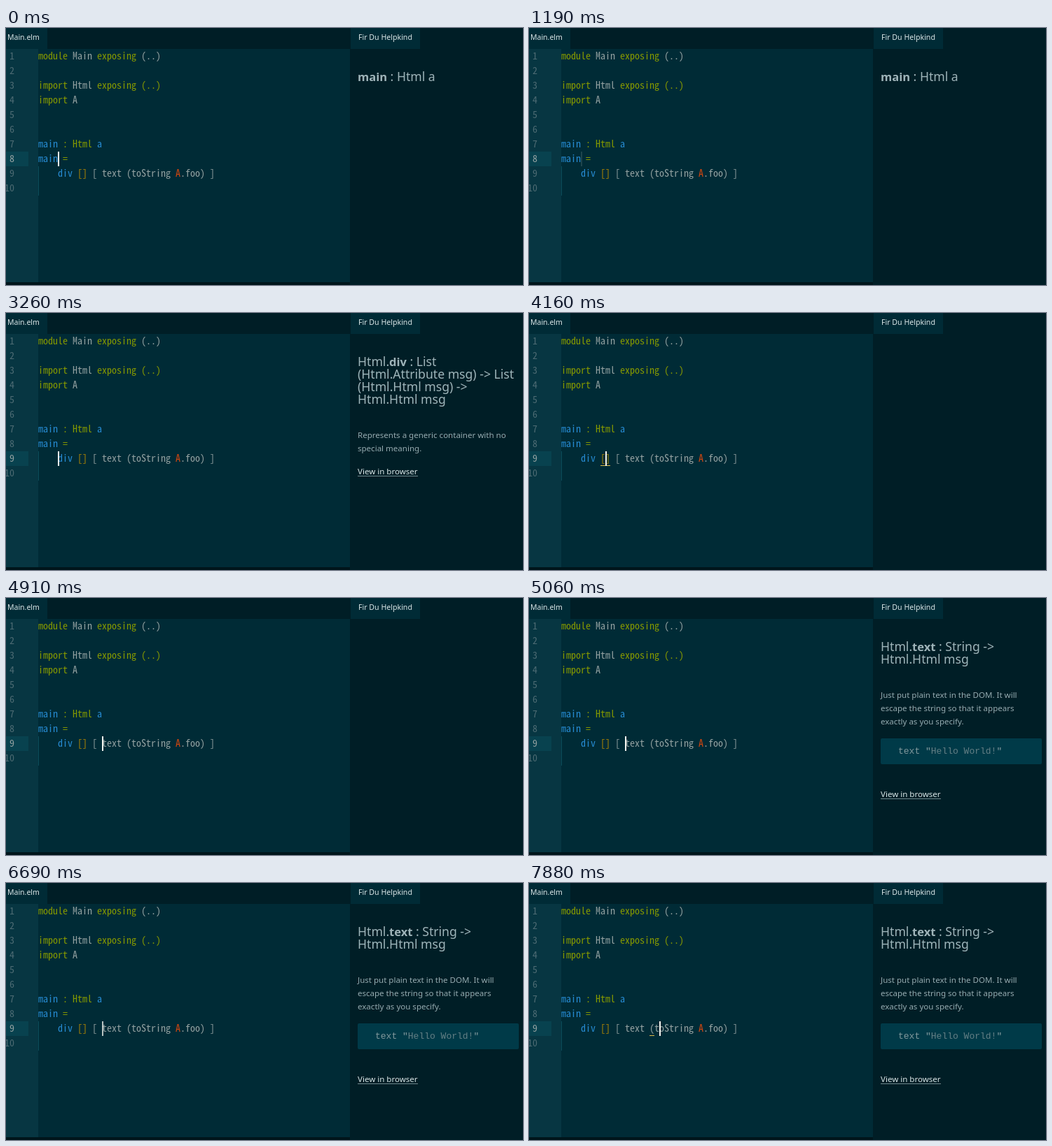
Write an HTML page with a canvas that moves like this. It is 738 px wide and 368 px high and loops after 8000 ms.

```html
<!DOCTYPE html>
<html lang="en">
<head>
<meta charset="utf-8">
<title>Editor with documentation panel</title>
<style>
html, body { margin: 0; width: 100%; height: 100%; overflow: hidden; background: #002b36; }
canvas { display: block; }
</style>
</head>
<body>
<canvas id="stage" width="738" height="368"></canvas>
<script>
const ctx = document.getElementById('stage').getContext('2d', { alpha: false });

const LOOP = 8000, STEP = 148.6;
const ROW = 21, TOP = 30, LEFT = 46, CELL = 7;
const SANS = '"Noto Sans", "Open Sans", sans-serif';
const TITLE = '17.6px ' + SANS;
const STRONG = 'bold 16.5px ' + SANS;
const BODY = '11.54px ' + SANS;
const MONO = monoFont('"Noto Sans Mono CJK JP", "Noto Sans Mono CJK SC", "Noto Sans Mono", monospace');

const C = {
  bg: '#002b36', dark: '#001e26', gutter: '#073642', active: '#08424f',
  grey: '#93a1a1', green: '#859900', blue: '#268bd2', yellow: '#b58900',
  red: '#d5470f', number: '#4d6b73', title: '#9fb4b9', body: '#96abb0',
  bright: '#dbe6e7'
};

// Each row: [column, text, colour] tokens
const code = [
  [[0, 'module', 'green'], [7, 'Main', 'grey'], [12, 'exposing', 'green'], [21, '(..)', 'grey']],
  [],
  [[0, 'import', 'green'], [7, 'Html', 'grey'], [12, 'exposing (..)', 'green']],
  [[0, 'import', 'green'], [7, 'A', 'grey']],
  [],
  [],
  [[0, 'main', 'blue'], [5, ': Html', 'green'], [12, 'a', 'blue']],
  [[0, 'main', 'blue'], [5, '=', 'green']],
  [[4, 'div', 'blue'], [8, '[]', 'yellow'], [11, '[ text (toString', 'grey'],
   [28, 'A', 'red'], [29, '.foo) ]', 'grey']],
  []
];
const brackets = [[8, 9], [11, 35], [18, 33]];

// Caret moves: [time, row, column]
const moves = [
  [-330, 7, 4], [2085, 8, 4],
  [3300, 8, 5], [3450, 8, 7], [3600, 8, 8], [3760, 8, 9],
  [4340, 8, 10], [4500, 8, 11], [4650, 8, 12], [4800, 8, 13],
  [6850, 8, 14], [7000, 8, 15], [7150, 8, 16], [7300, 8, 17],
  [7460, 8, 18], [7600, 8, 19], [7750, 8, 20]
];
const REST = 500, BLINK = 800, FADE = 250;

// Size the font so that one character fills one cell
function monoFont(family) {
  ctx.font = '100px ' + family;
  return (CELL * 100 / ctx.measureText('m').width).toFixed(3) + 'px ' + family;
}

function box(x, y, w, h, color) {
  ctx.fillStyle = color;
  ctx.fillRect(x, y, w, h);
}

function text(str, x, y, font, color) {
  ctx.font = font;
  ctx.fillStyle = color;
  ctx.fillText(str, x, y);
  return x + ctx.measureText(str).width;
}

function lines(list, y, gap, font, color) {
  list.forEach((s, i) => text(s, 502, y + i * gap, font, color));
}

// Solid after a move, then a steady blink with soft edges
function caretAlpha(i, t) {
  const age = t - moves[i][0];
  if (age < REST) {
    const from = i ? caretAlpha(i - 1, moves[i][0]) : 1;
    return Math.min(1, from + age / FADE);
  }
  const p = (age - REST) % BLINK;
  return p < BLINK / 2 ? Math.max(0, 1 - p / FADE)
                       : Math.min(1, (p - BLINK / 2) / FADE);
}

function drawBrackets(col) {
  const near = n => col === n || col === n + 1;
  for (const [a, b] of brackets) {
    const lit = near(a) || near(b) ? [a, b] : a === 18 && col === 20 ? [a] : [];
    for (const n of lit) box(LEFT + n * CELL, TOP + 8 * ROW + 20, CELL, 1, '#dcbb49');
  }
}

function drawEditor(t) {
  let i = moves.length - 1;
  while (moves[i][0] > t) i--;
  const [, row, col] = moves[i];

  box(0, TOP, LEFT, 334, C.gutter);
  box(0, TOP + row * ROW, 32, ROW, C.active);
  box(LEFT, TOP + 8 * ROW, 1, 2 * ROW, '#0b4b59');

  code.forEach((tokens, r) => {
    const y = TOP + r * ROW + 15, num = String(r + 1);
    text(num, 12 - CELL * num.length, y, MONO, r === row ? '#93a1a1' : C.number);
    for (const [c, s, color] of tokens) text(s, LEFT + c * CELL, y, MONO, C[color]);
  });

  if (row === 8) drawBrackets(col);
  ctx.globalAlpha = caretAlpha(i, t);
  box(LEFT + col * CELL, TOP + row * ROW, 2, ROW, '#f4f4ee');
  ctx.globalAlpha = 1;
}

function heading(parts) {
  let x = 502;
  parts.forEach((s, i) => { x = text(s, x, 76, i % 2 ? STRONG : TITLE, C.title); });
}

function link(y) {
  const end = text('View in browser', 502, y, BODY, C.bright);
  box(502, y + 2, Math.round(end) - 502, 1, '#72888d');
}

function drawMain() {
  heading(['', 'main', ' : Html a']);
}

function drawDiv() {
  heading(['Html.', 'div', ' : List']);
  lines(['(Html.Attribute msg) -> List', '(Html.Html msg) ->', 'Html.Html msg'],
    94, 18, TITLE, C.title);
  lines(['Represents a generic container with no', 'special meaning.'],
    179, 19, BODY, C.body);
  link(231);
}

function drawText() {
  heading(['Html.', 'text', ' : String ->']);
  lines(['Html.Html msg'], 94, 18, TITLE, C.title);
  lines(['Just put plain text in the DOM. It will',
    'escape the string so that it appears', 'exactly as you specify.'],
    143, 19, BODY, C.body);
  ctx.fillStyle = '#003a48';
  ctx.beginPath();
  ctx.roundRect(502, 201, 230, 37, 2);
  ctx.fill();
  const font = '13px "Liberation Mono", monospace';
  let x = text('text "', 527, 223, font, '#82999d');
  x = text('Hello World!', x, 223, font, '#647f85');
  text('"', x, 223, font, '#82999d');
  link(285);
}

function drawPanel(t) {
  box(491, 0, 247, 368, C.dark);
  box(492, 0, 99, TOP, C.bg);
  text('Fir Du Helpkind', 503, 17, '10.6px ' + SANS, C.bright);
  if (t < 2520) drawMain();
  else if (t < 4150) drawDiv();
  else if (t > 5040) drawText();
}

function draw(now) {
  const t = Math.floor((now % LOOP + 10) / STEP) * STEP;
  box(0, 0, 738, 368, C.bg);
  box(0, 0, 491, TOP, C.dark);
  box(0, 0, 59, TOP, C.bg);
  box(0, 364, 491, 4, '#00151b');
  text('Main.elm', 2, 17, '10.5px ' + SANS, C.bright);
  drawEditor(t);
  drawPanel(t);
}

let start;
function tick(now) {
  start ??= now;
  draw(now - start);
  requestAnimationFrame(tick);
}
draw(0);
requestAnimationFrame(tick);
</script>
</body>
</html>
```
